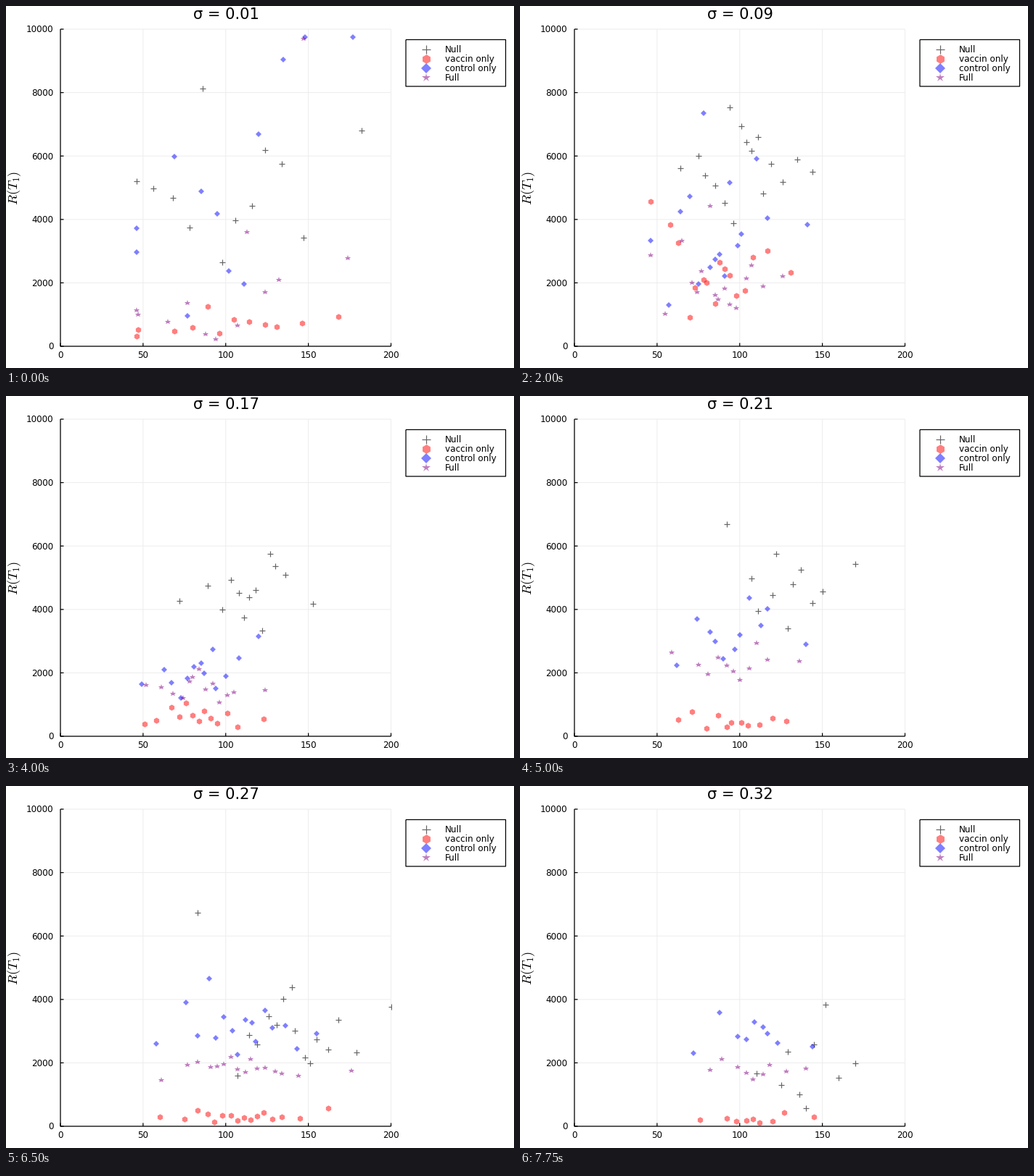
Animation of 700 by 500 pixels, one loop 8000 ms. Source, as a matplotlib script:

```python
import numpy as np
import matplotlib as mpl
import matplotlib.pyplot as plt
from matplotlib.animation import FuncAnimation

W, H = 700, 500
PT = 0.72  # points per pixel at 100 dpi
LEFT, RIGHT, TOP, BOTTOM = 75, 530.5, 32, 470
FRAMES, INTERVAL = 32, 250

mpl.rcParams["font.family"] = "DejaVu Sans"
mpl.rcParams["mathtext.fontset"] = "cm"

# label, marker, colour, size in pixels
SERIES = [
    ("Null", "+", "black", 8.6),
    ("vaccin only", "h", "red", 8.4),
    ("control only", "D", "blue", 6.2),
    ("Full", "*", "purple", 8.6),
]

# Noise levels in hundredths, with the trends that hold at them
LEVELS = [1, 6, 12, 17, 21, 27, 32]
COUNT = [12, 15, 17, 13, 11, 16, 9]
CENTRE_X = [100, 82, 90, 84, 96, 109, 108]
SPREAD_X = [42, 22, 21, 19, 21, 26, 18]
CENTRE_Y = [
    [4800, 5000, 6350, 4500, 4800, 2950, 1700],
    [640, 3400, 1150, 580, 450, 290, 210],
    [4600, 4200, 2700, 2000, 3150, 3050, 2850],
    [1300, 2450, 1450, 1500, 2280, 1830, 1790],
]


def spread_y(k, level):
    """Relative spread of each series; the controlled ones settle with noise."""
    return [0.13 + 0.0011 * (level - 14) ** 2,
            0.36,
            0.12 + 0.7 * np.exp(-level / 10),
            0.08 + 1.0 * np.exp(-level / 7)][k]


def spaced(rng, n):
    """Bell-shaped values, evenly ranked and shuffled, with unit spread."""
    u = (rng.permutation(n) + rng.uniform(0.2, 0.8, n)) / n
    return 0.6 * np.log(u / (1 - u))


def points(level):
    """Four point clouds for one noise level."""
    rng = np.random.default_rng(level)
    n = round(np.interp(level, LEVELS, COUNT))
    width = np.interp(level, LEVELS, SPREAD_X)
    clouds = []
    for k, centres in enumerate(CENTRE_Y):
        mid = np.interp(level, LEVELS, CENTRE_X)
        if k == 0:
            mid += min(level * 1.8, 32)
        x = np.round(mid + width * spaced(rng, n))
        y = np.interp(level, LEVELS, centres) * np.exp(spread_y(k, level) * spaced(rng, n))
        clouds.append((np.clip(x, 46, 200), np.clip(y, 75, 9750)))
    return clouds


fig = plt.figure(figsize=(W / 100, H / 100), dpi=100, facecolor="white")

# Pixel-space layer for frame, labels and legend
page = fig.add_axes([0, 0, 1, 1])
page.set(xlim=(0, W), ylim=(H, 0))
page.axis("off")

ax = fig.add_axes([LEFT / W, 1 - BOTTOM / H, (RIGHT - LEFT) / W, (BOTTOM - TOP) / H])
ax.set(xlim=(0, 200), ylim=(0, 10000))
ax.axis("off")


def line(xs, ys, color="black", width=1.25, z=2):
    page.plot(xs, ys, color=color, lw=width * PT, zorder=z,
              solid_capstyle="butt", snap=False)


def label(x, y, text, size=12, **kw):
    return page.text(x, y, text, fontsize=size * PT, **kw)


def markers(axes, xs, ys, marker, color, size, **kw):
    edge = 1.2 * PT if marker == "+" else 0
    return axes.plot(xs, ys, marker, color=color, ms=size * PT, mew=edge,
                     alpha=0.6 if marker == "+" else 0.5, **kw)[0]


for v in range(0, 201, 50):
    x = LEFT + v / 200 * (RIGHT - LEFT)
    line([x, x], [TOP, BOTTOM], "#ededed", 1, z=1)
    line([x, x], [BOTTOM, BOTTOM - 4.5])
    label(x, 486.5, str(v), ha="center", va="baseline")
for v in range(0, 10001, 2000):
    y = BOTTOM - v / 10000 * (BOTTOM - TOP)
    line([LEFT, RIGHT], [y, y], "#ededed", 1, z=1)
    line([LEFT, LEFT + 4.5], [y, y])
    label(65.5, y + 4.4, str(v), ha="right", va="baseline")
line([LEFT, LEFT], [TOP, BOTTOM + 0.5])
line([LEFT, RIGHT], [BOTTOM, BOTTOM])

label(12, 251.5, "$R(T_1)$", 18.5, rotation=90, ha="center", va="center")
title = label(303, 18.5, "", 21, ha="center", va="baseline")

line([551, 688.5, 688.5, 551, 551], [46.5, 46.5, 111, 111, 46.5])
clouds = []
for i, (name, marker, color, size) in enumerate(SERIES):
    y = 59.5 + 13 * i
    markers(page, [578.5], [y], marker, color, size * 1.5)
    label(605.2, y + 4.5, name, va="baseline")
    clouds.append(markers(ax, [], [], marker, color, size, zorder=3 + i))


def draw(i):
    level = i + 1
    title.set_text(f"σ = {level / 100:.2f}")
    for cloud, (x, y) in zip(clouds, points(level)):
        cloud.set_data(x, y)
    return [title, *clouds]


anim = FuncAnimation(fig, draw, frames=FRAMES, interval=INTERVAL,
                     repeat=True, repeat_delay=0, blit=False)
plt.show()
```
